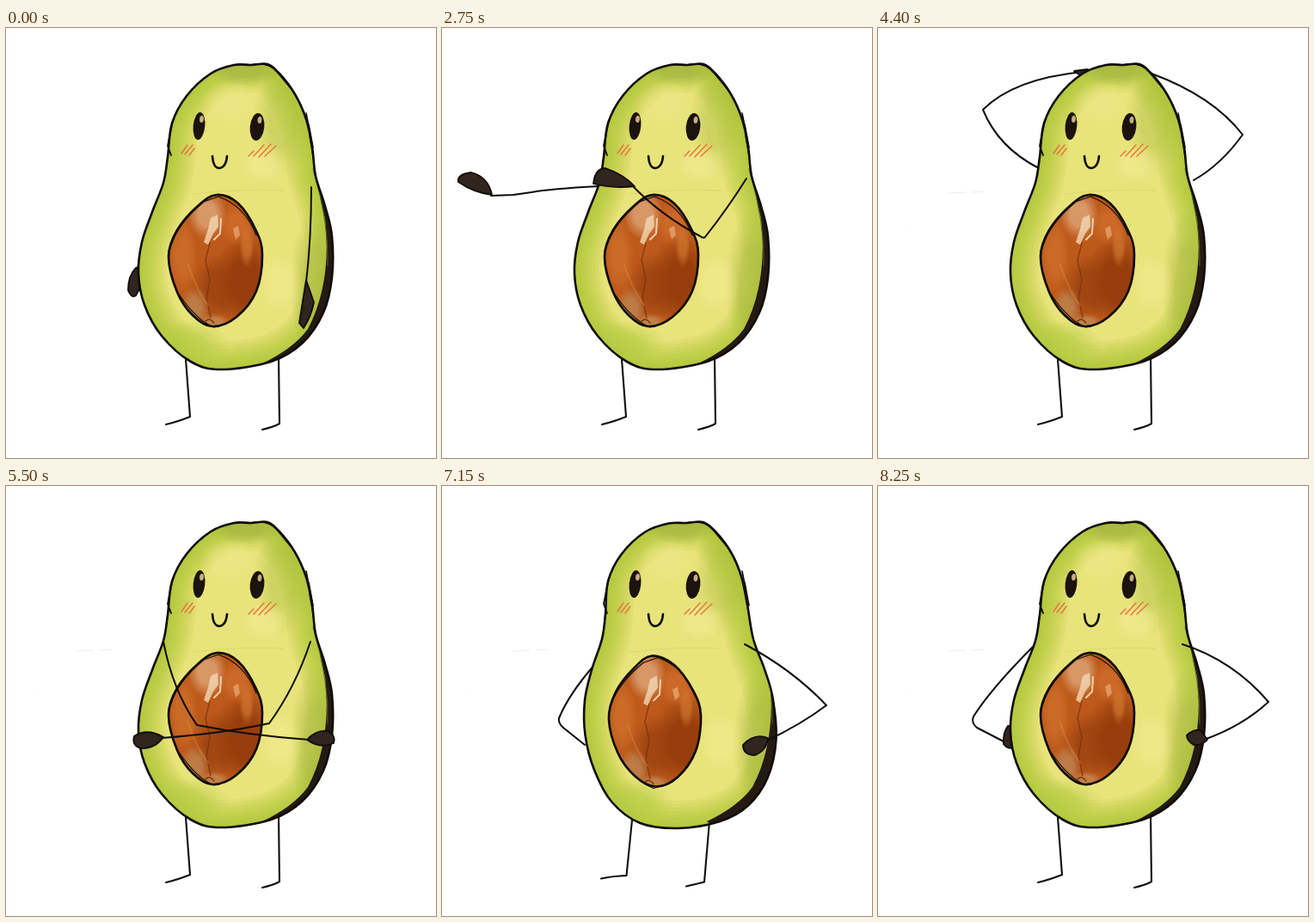
These frames come from a looping animation (500x500 px, 8.8 s). An HTML page with a canvas:

```html
<!DOCTYPE html>
<html>
<head>
<meta charset="utf-8">
<style>
html, body { margin: 0; width: 100%; height: 100%; overflow: hidden; background: #fff }
canvas { display: block; width: 100vmin; height: 100vmin }
</style>
</head>
<body>
<canvas id="stage" width="500" height="500"></canvas>
<script>
const ctx = document.getElementById('stage').getContext('2d');
const STEP = 550, INK = '#100d09', HAND = '#30251f';

// Body and pit outlines: upright and leaning
const BODY = [
  [[265,43, 285,43, 304,42, 318,53, 336,77, 349,106, 356,138, 360,172, 371,207, 379,242, 379,290, 369,331, 345,366, 308,388,
    250,397, 215,388, 181,358, 161,322, 154,285, 158,249, 170,214, 183,180, 188,150, 193,111, 210,79, 238,53],
   [262,44, 283,43, 303,42, 318,53, 336,77, 347,104, 354,138, 364,184, 379,219, 390,250, 398,300, 388,348, 366,378, 338,392,
    300,399, 246,396, 214,377, 193,338, 179,294, 174,250, 178,214, 189,176, 192,148, 193,111, 207,80, 234,54]],
];
const PIT = [
  [245,194, 270,204, 291,236, 298,264, 291,306, 268,336, 240,347, 217,334, 199,307, 189,266, 199,235, 223,207],
  [243,201, 270,212, 293,240, 304,269, 299,310, 279,342, 256,352, 232,341, 210,314, 199,276, 205,244, 225,215]
];

const mix = (a, b, s) => a.map((v, i) => v + (b[i] - v) * s);

// Closed smooth curve through flat x,y pairs
function smooth(p) {
  const n = p.length / 2, path = new Path2D();
  const at = i => [p[2 * ((i + n) % n)], p[2 * ((i + n) % n) + 1]];
  path.moveTo(...at(0));
  for (let i = 0; i < n; i++) {
    const [a, b, c, d] = [at(i - 1), at(i), at(i + 1), at(i + 2)];
    path.bezierCurveTo(b[0] + (c[0] - a[0]) / 6, b[1] + (c[1] - a[1]) / 6,
      c[0] - (d[0] - b[0]) / 6, c[1] - (d[1] - b[1]) / 6, ...c);
  }
  path.closePath();
  return path;
}

function line(d, width = 2, color = INK) {
  ctx.lineWidth = width;
  ctx.strokeStyle = color;
  ctx.stroke(d instanceof Path2D ? d : new Path2D(d));
}

function fill(d, color) {
  ctx.fillStyle = color;
  ctx.fill(d instanceof Path2D ? d : new Path2D(d));
}

function glow(x, y, rx, ry, color) {
  ctx.save();
  ctx.translate(x, y);
  ctx.scale(rx, ry);
  const g = ctx.createRadialGradient(0, 0, 0, 0, 0, 1);
  g.addColorStop(0, color);
  g.addColorStop(.45, color);
  g.addColorStop(1, color.slice(0, 7) + '00');
  ctx.fillStyle = g;
  ctx.fillRect(-1, -1, 2, 2);
  ctx.restore();
}

// Arm poses: [line, hand, in front of the body]
const reach = 'M350,182Q335,187 300,187Q240,189 200,192';
const near = {
  down: ['M355,185Q355,245 349,296', 'M349,293L358,319Q355,335 346,349L341,343Q345,318 349,293Z', 1],
  out: [reach, 'M202,192Q170,200 164,224Q157,240 160,243Q166,248 180,239Q193,222 202,192Z', 1],
  up: [reach, 'M201,192Q180,196 159,184Q158,167 175,167Q194,172 201,192Z', 1],
  shoulder: ['M354,175Q332,210 306,243Q304,245 300,242Q255,218 221,183',
    'M176,181Q178,163 190,163Q211,170 224,184Q198,187 176,181Z', 1],
  head: ['M367,177Q399,159 424,124Q389,79 318,53', '', 0],
  cross: ['M354,181Q336,235 306,276Q250,288 181,293', 'M183,292Q164,281 149,291Q146,302 157,305Q173,306 183,292Z', 1],
  hip: ['M354,184Q413,203 454,251Q424,279 379,295', 'M359,290Q367,282 375,284L383,295Q377,302 367,301Q359,296 359,290Z', 1],
  half: ['M352,184Q407,213 447,255Q418,277 376,297', 'M350,301Q363,287 379,293Q378,307 364,313Q350,313 350,301Z', 1],
  lean: ['M348,182Q362,201 377,213Q406,233 430,260Q412,277 372,299', 'M375,297Q350,300 340,318Q347,329 362,321Q371,313 375,297Z', 1]
};
const far = {
  down: ['M190,178Q173,205 160,243L153,280', 'M151,279Q142,288 142,305Q146,315 151,311L160,294L156,278Z', 0],
  out: ['M182,184Q128,187 68,193', 'M70,193Q40,201 34,223Q27,236 30,239Q36,243 49,234Q62,218 70,193Z', 0],
  up: ['M182,184Q125,187 104,191L83,194L57,195', 'M58,194Q38,192 19,179Q17,170 34,168Q54,173 58,194Z', 0],
  shoulder: ['M180,186Q196,218 222,245Q270,222 322,187', 'M319,188Q331,168 350,169Q363,172 361,181Q343,191 319,188Z', 1],
  head: ['M187,163Q140,139 122,95Q158,59 238,51', 'M228,50L244,48L238,57Z', 0],
  cross: ['M183,181Q194,238 222,278Q283,290 352,295', 'M350,295Q361,283 375,285Q384,291 381,299Q365,306 350,295Z', 1],
  hip: ['M181,186Q132,235 111,268Q108,275 115,281L146,297', 'M151,279Q145,287 146,300Q151,307 160,304L158,280Z', 0],
  half: ['M179,206Q148,241 136,270Q135,276 141,281L166,301', '', 0],
  lean: ['M180,215Q165,239 160,263Q160,276 180,305', '', 0]
};

// [near arm, far arm, lean] for each beat
const DANCE = [
  ['down', 'down', 0], ['out', 'down', 0], ['out', 'out', 0], ['out', 'up', 0],
  ['up', 'up', 0], ['shoulder', 'up', 0], ['shoulder', 'shoulder', 0], ['head', 'shoulder', 0],
  ['head', 'head', 0], ['cross', 'head', 0], ['cross', 'cross', 0], ['hip', 'cross', 0],
  ['hip', 'hip', 0], ['half', 'half', .5], ['lean', 'lean', 1], ['hip', 'hip', 0]
];

function arm([d, hand], color) {
  line(d, 2, color);
  if (!hand) return;
  fill(hand, HAND);
  line(hand, 1.8);
}

function legs(s) {
  const leg = (a, b) => {
    const p = mix(a, b, s);
    line(`M${p[0]},${p[1]}L${p[2]},${p[3]}Q${p[4] + 13},${p[5] - 3} ${p[4]},${p[5]}`, 2.1);
  };
  leg([209,385, 214,452, 186,461], [233,392, 215,454, 184,452]);
  leg([317,382, 318,460, 298,467], [305,397, 292,461, 270,464]);
}

function body(s) {
  const shape = smooth(mix(...BODY[0], s));
  ctx.save();
  ctx.clip(shape);
  ctx.fillStyle = '#e8e37a';
  ctx.fillRect(0, 0, 500, 500);
  for (let w = 8; w <= 64; w += 8) line(shape, w, 'rgba(148,180,34,.115)');
  glow(322 + 10 * s, 105, 34, 70, '#a5bb3a66');
  glow(278, 48, 46, 20, '#9cae3f88');
  glow(360 + 18 * s, 300, 30, 90, '#a2b43a88');
  glow(210 + 20 * s, 368, 50, 28, '#b5cc4499');
  glow(300, 158, 28, 22, '#f2eb9499');
  glow(318 + 12 * s, 297, 26, 36, '#f2eb8f99');
  glow(260, 88, 34, 26, '#efe98a77');
  line('M218,193Q275,186 323,189', 1, '#c4c45c66');
  ctx.translate(20 * s, 0);
  fill('M352,124Q361,180 371,222Q379,297 351,350Q334,373 298,390L340,420L420,400L420,124Z', '#241a14');
  line('M357,164Q376,228 374,276', 1, '#52602b');
  ctx.restore();
  line(shape, 2.6);
  line('M284,43Q305,38 316,52L331,70M349,99L357,139L352,112', 1.6);
  line('M194,107L188,137L192,148', 1.8);
}

function pit(s) {
  const shape = smooth(mix(...PIT, s));
  ctx.save();
  ctx.clip(shape);
  ctx.fillStyle = '#bd5a1b';
  ctx.fillRect(150, 150, 200, 230);
  ctx.translate(8 * s, 7 * s);
  glow(278, 294, 38, 55, '#8f3609cc');
  glow(245, 302, 30, 40, '#98400fbb');
  glow(206, 264, 17, 44, '#d0732eaa');
  glow(234, 217, 23, 29, '#dfa67acc');
  glow(268, 228, 20, 25, '#ce6a2add');
  glow(219, 326, 18, 25, '#bd8350cc');
  glow(242, 342, 18, 10, '#c58c58bb');
  glow(280, 253, 9, 26, '#d47933aa');
  fill('M238,221L246,217L247,231L241,239L235,252L230,249L235,234Z', '#f3d8b5cc');
  fill('M264,233L270,230L272,241L267,246Z', '#edb98499');
  line('M250,222L249,239L242,246', 2, '#f2cfab');
  line('M237,250L232,270L237,292L233,314L238,337', 1.5, '#752d0baa');
  line('M212,275Q222,306 235,322', 2, '#e0984f55');
  ctx.restore();
  line(shape, 2.7);
  ctx.save();
  ctx.translate(8 * s, 7 * s);
  line('M192,253Q199,228 230,202L247,196Q278,207 291,241', 1.2);
  line('M202,311Q222,340 242,348Q270,342 285,317', 1.2);
  line('M232,341Q237,336 242,343', 1.2, '#5e290f');
  ctx.restore();
}

function eye(x, y, rx) {
  ctx.beginPath();
  ctx.ellipse(x, y, rx, 16, .1, 0, 7);
  ctx.fillStyle = '#1c130f';
  ctx.fill();
  ctx.beginPath();
  ctx.ellipse(x + 3, y - 8, 2.4, 4, .1, 0, 7);
  ctx.fillStyle = '#c9ad83';
  ctx.fill();
}

function face() {
  eye(224.5, 114, 6.8);
  eye(292, 115, 8.3);
  line('M240,149Q241,163 248,163Q256,162 257,149', 2.6);
  line('M204,146L211,136M208,147L217,136M213,148L219,140', 1.5, '#e8763f');
  line('M282,149L288,143M288,149L300,136M294,150L308,135M301,149L314,137', 1.5, '#e8763f');
}

function draw(now) {
  const beat = Math.floor(now / STEP) % DANCE.length;
  const [n, f, s] = DANCE[beat];
  const arms = [near[n], far[f]];
  const color = s === 1 ? '#454545' : INK;
  ctx.fillStyle = '#fff';
  ctx.fillRect(0, 0, 500, 500);
  ctx.lineCap = ctx.lineJoin = 'round';
  if (beat > 5) line('M83,192L102,191M110,191L123,190M30,235L31,236', 1, '#ededed');
  legs(s);
  arms.filter(a => !a[2]).forEach(a => arm(a, color));
  body(s);
  pit(s);
  face();
  arms.filter(a => a[2]).forEach(a => arm(a, color));
}

function tick() {
  draw(performance.now());
  requestAnimationFrame(tick);
}
tick();
</script>
</body>
</html>
```
